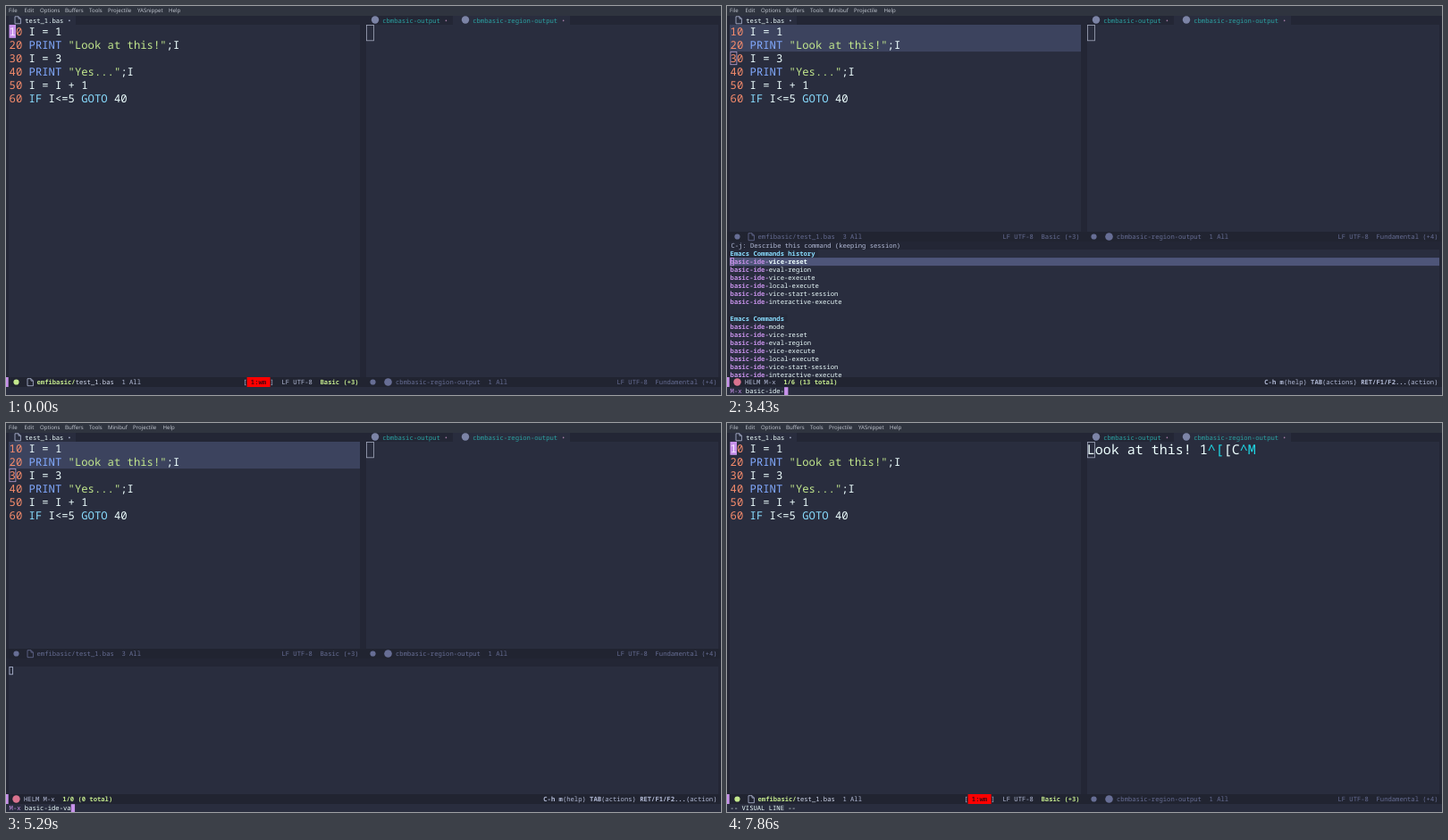
An HTML page that plays this animation: 800 px wide and 436 px high, repeating every 8 s.

```html
<!DOCTYPE html>
<html lang="en">
<head>
<meta charset="utf-8">
<title>BASIC region evaluation</title>
<style>
html, body { margin: 0; width: 100%; height: 100%; overflow: hidden; background: #292d3e; }
svg { display: block; width: 800px; height: 436px; }
text { white-space: pre; text-rendering: geometricPrecision; font: 7.2px "Noto Sans Mono", "DejaVu Sans Mono", monospace; }
.code { font-size: 12.22px; }
.out { font-size: 15px; }
.menu { font: 6.1px "Open Sans", "Noto Sans", sans-serif; }
</style>
</head>
<body>
<svg id="stage" viewBox="0 0 800 436"></svg>
<script>
const BG = '#292d3e', DARK = '#232635', BAR = '#212431', DIM = '#676e95', GREY = '#b4bcd8',
  WHITE = '#eeffff', PURPLE = '#c792ea', GREEN = '#c3e88d', ORANGE = '#f78c6c', BLUE = '#82aaff',
  CYAN = '#89ddff', YELLOW = '#ffcb6b', TEAL = '#2ba5a5', ESCAPE = '#1fd9e6';
const CW = 4.32, LINE = 15.05, ROW = 9.07, LOOP = 8000, TICK = 1000 / 7;

const rect = (x, y, w, h, fill) => `<rect x="${x}" y="${y}" width="${w}" height="${h}" fill="${fill}"/>`;
const box = (x, y, w, h, color) =>
  `<rect x="${x}" y="${y}" width="${w}" height="${h}" fill="none" stroke="${color}" stroke-width=".8"/>`;
const dot = (x, y, r, fill) => `<circle cx="${x}" cy="${y}" r="${r}" fill="${fill}"/>`;
const text = (x, y, s, fill = WHITE, cls = '') => `<text x="${x}" y="${y}" fill="${fill}" class="${cls}">${s}</text>`;
const span = (fill, s, extra = '') => `<tspan fill="${fill}" ${extra}>${s}</tspan>`;
const bold = (fill, s) => span(fill, s, 'font-weight="700"');
const page = (x, y, color) =>
  `<path d="M${x} ${y}h4l2.4 2.4v5.6h-6.4zM${x + 4} ${y}v2.4h2.4" fill="none" stroke="${color}" stroke-width=".8"/>`;

const print = s => `${span(BLUE, 'PRINT')} ${span(GREEN, s)};I`;
const program = ['I = 1', print('"Look at this!"'), 'I = 3', print('"Yes..."'), 'I = I + 1',
  `${span(CYAN, 'IF')} I&lt;=5 ${span(CYAN, 'GOTO')} 40`];

const ide = s => 'basic-ide-' + s;
const history = ['vice-reset', 'eval-region', 'vice-execute', 'local-execute', 'vice-start-session',
  'interactive-execute'].map(ide);
const lists = {
  all: { count: '1/6 (23 total)', past: history, rest: ['basic-mode', 'basic-renumber|C-c C-r', ide('mode'),
    'basic-save-buffer', 'basic-indent-line', 'basic-format-code|C-c C-f', ide('vice-reset')] },
  ide: { count: '1/6 (13 total)', past: history, rest: [ide('mode'), ide('vice-reset'), ide('eval-region'),
    ...history.slice(2)] },
  one: { count: '1/1 (2 total)', past: [ide('eval-region')], rest: [ide('eval-region')] },
  none: { count: '1/0 (0 total)' }
};

// Each step: [tick, changed state]. match = number of highlighted letters.
const steps = [
  [0, { line: 1, region: 0, status: '1 All', sel: '', echo: '', cursor: true }],
  [4, { region: 1, sel: '1L', echo: '-- VISUAL LINE --' }],
  [6, { line: 2, region: 2, echo: '' }],
  [7, { status: '2 All', sel: '2L' }],
  [10, { cursor: false }],
  [12, { line: 3, region: 2, status: '3 All', cursor: true, list: 'none', input: '', match: 0 }],
  [13, { list: 'all' }],
  [14, { input: 'b' }],
  [15, { input: 'ba', match: 1 }],
  [16, { input: 'bas', match: 2 }],
  [17, { input: 'basi', match: 3 }],
  [18, { match: 4 }],
  [19, { input: 'basic' }],
  [20, { input: 'basic-', match: 5 }],
  [21, { input: 'basic-i', match: 6 }],
  [22, { input: 'basic-id', match: 7 }],
  [23, { input: 'basic-ide', match: 9, list: 'ide' }],
  [24, { input: ide(''), match: 10 }],
  [28, { cursor: false }],
  [30, { input: ide('e'), cursor: true }],
  [31, { list: 'one', match: 11 }],
  [32, { input: ide('ea') }],
  [33, { input: ide('e') }],
  [34, { input: ide('') }],
  [35, { input: ide('v') }],
  [36, { input: ide('va') }],
  [37, { list: 'none' }],
  [38, { input: ide('v') }],
  [39, { input: ide('') }],
  [40, { input: ide('e') }],
  [41, { input: ide('eva'), list: 'one', match: 13 }],
  [44, { input: null }],
  [45, { echo: 'Wrote /tmp/basic_ide_region' }],
  [46, { list: null, line: 2, status: '2 All', output: true }],
  [49, { cursor: false }],
  [52, { cursor: true, region: 0, sel: '', echo: '' }],
  [53, { line: 1, status: '1 All' }],
  [55, { echo: '-- VISUAL LINE --' }]
];

function menuBar(helm) {
  const items = helm
    ? [['Minibuf', 114], ['Projectile', 142], ['Help', 175.5]]
    : [['Projectile', 114], ['YASnippet', 147], ['Help', 182]];
  return rect(0, 0, 800, 11, '#2f343f') +
    [['File', 3], ['Edit', 20.5], ['Options', 38], ['Buffers', 66], ['Tools', 93], ...items]
      .map(([s, x]) => text(x, 7.4, s, '#c6cbd4', 'menu')).join('');
}

function tabs() {
  const outputTab = (x, name) => dot(x, 15.5, 4.2, '#7c84a6') +
    text(x + 8.2, 18.6, `${name} ${span('#a77fa8', '•')}`, TEAL);
  return rect(0, 11, 800, 10, DARK) + rect(3, 11, 75, 10, BG) + rect(500, 11, 131, 10, BG) +
    page(10, 11.8, GREY) + text(21.3, 18.6, `test_1.bas ${span(GREY, '•')}`) +
    outputTab(413, 'cbmbasic-output') + outputTab(514, 'cbmbasic-region-output');
}

function editor(s) {
  const top = 21 + (s.line - 1) * LINE, block = s.cursor && !s.list;
  let svg = rect(3, 21, 393, s.region * LINE, '#3c435e');
  if (block) svg += rect(3.5, top, 7.5, 14.8, PURPLE);
  program.forEach((code, i) => {
    const n = i + 1;
    const number = block && n === s.line ? span('#f8e8ff', n) + '0' : n + '0';
    svg += text(3.6, 32.6 + i * LINE, `${span(ORANGE, number)} ${code}`, WHITE, 'code');
  });
  return s.list ? svg + box(3.9, top + .4, 7, 14.2, '#b9a0d2') : svg;
}

function modeLines(s) {
  const y = s.list ? 253 : 416, mid = y + 5.5, base = y + 8.1, active = !s.list;
  const file = active ? bold(GREEN, 'emfibasic/') + span('#d3daee', 'test_1.bas') : 'emfibasic/test_1.bas';
  const sel = active && s.sel ? ' ' + span(PURPLE, s.sel) : '';
  const main = active ? GREY : DIM;
  let svg = rect(0, y, 800, 11, BAR);
  if (active) {
    svg += rect(0, y, 2.7, 11, PURPLE) + rect(269.6, y, 26, 11, '#ff0000') +
      text(265.2, base, `[ ${bold('#4a0710', '1:wm')} ]`, GREY);
  }
  return svg + dot(11.5, mid, 3.1, active ? (s.sel ? YELLOW : GREEN) : DIM) + page(24, y + 1.7, main) +
    text(34.5, base, `${file}  ${s.status}${sel}`, main) +
    text(308.4, base, `LF UTF-8  ${active ? bold(GREEN, 'Basic (+3)') : 'Basic (+3)'}`, main) +
    dot(410.5, mid, 3.1, DIM) + dot(427.5, mid, 4.3, DIM) +
    text(436, base, 'cbmbasic-region-output  1 All', DIM) +
    text(683.4, base, 'LF UTF-8  Fundamental (+4)', DIM);
}

function candidate(item, match, selected) {
  const [name, key] = item.split('|');
  const tail = name.slice(match);
  return bold(PURPLE, name.slice(0, match)) + (selected ? bold(WHITE, tail) : tail) +
    (key ? ` (${span('#e9a04a', key, 'text-decoration="underline"')})` : '');
}

function helm(s) {
  const { count, past, rest } = lists[s.list];
  let svg = rect(3, 264, 794, 152, BG) + rect(0, 264, 800, 9, DARK);
  if (past) {
    const head = (row, title) => rect(3, 264 + row * ROW, title.length * CW + 4, ROW, '#252939') +
      text(3.6, 270.9 + row * ROW, bold(CYAN, title));
    const items = (row, list, first) => list.map((item, i) =>
      text(3.6, 270.9 + (row + i) * ROW, candidate(item, s.match, first && !i))).join('');
    const next = past.length + 3;
    svg += text(4.4, 270.9, 'C-j: Describe this command (keeping session)', GREY) +
      head(1, 'Emacs Commands history') + rect(3, 282.1, 794, 9, '#4e5579') +
      items(2, past, true) + box(3.9, 282.5, 3.6, 8.2, PURPLE) +
      head(next, 'Emacs Commands') + items(next + 1, rest);
  } else {
    svg += box(3.9, 273.5, 3.6, 8.3, GREY);
  }
  const hint = [['C-h m', 'help'], ['TAB', 'actions'], ['RET/F1/F2...', 'action']]
    .map(([key, does]) => `${bold(GREY, key)}(${does})`).join(' ');
  return svg + rect(0, 416, 800, 11, BAR) + rect(0, 416, 2.7, 11, PURPLE) + dot(11.5, 421.5, 4.2, '#d9738f') +
    text(20, 424.1, `HELM M-x  ${bold(GREEN, count)}`, GREY) + text(601.3, 424.1, hint, GREY);
}

function echoArea(s) {
  if (!s.list || s.input === null) return text(3.6, 434.1, s.echo);
  const end = 3.6 + (4 + s.input.length) * CW;
  return text(3.6, 434.1, span(PURPLE, 'M-x ') + s.input) +
    (s.cursor ? rect(end, 427.2, CW, 8.8, PURPLE) : '');
}

function scene(s) {
  const esc = c => span(ESCAPE, c);
  return rect(0, 0, 800, 436, BG) + rect(0, 11, 3, 416, DARK) + rect(396, 11, 7, 405, DARK) +
    rect(797, 11, 3, 416, DARK) + menuBar(s.list) + tabs() + editor(s) +
    (s.output ? text(402.8, 35.2, `Look at this! 1${esc('^[')}[C${esc('^M')}`, WHITE, 'out') : '') +
    box(403.4, 21.4, 8, 17.4, '#a3a9bd') + modeLines(s) + (s.list ? helm(s) : '') + echoArea(s);
}

const stage = document.getElementById('stage');
let shown = -1;
function draw(now) {
  const tick = Math.floor((now % LOOP + 5) / TICK) % 56;
  if (tick !== shown) {
    shown = tick;
    stage.innerHTML = scene(Object.assign({}, ...steps.filter(([k]) => k <= tick).map(([, change]) => change)));
  }
  requestAnimationFrame(draw);
}
draw(0);
</script>
</body>
</html>
```
